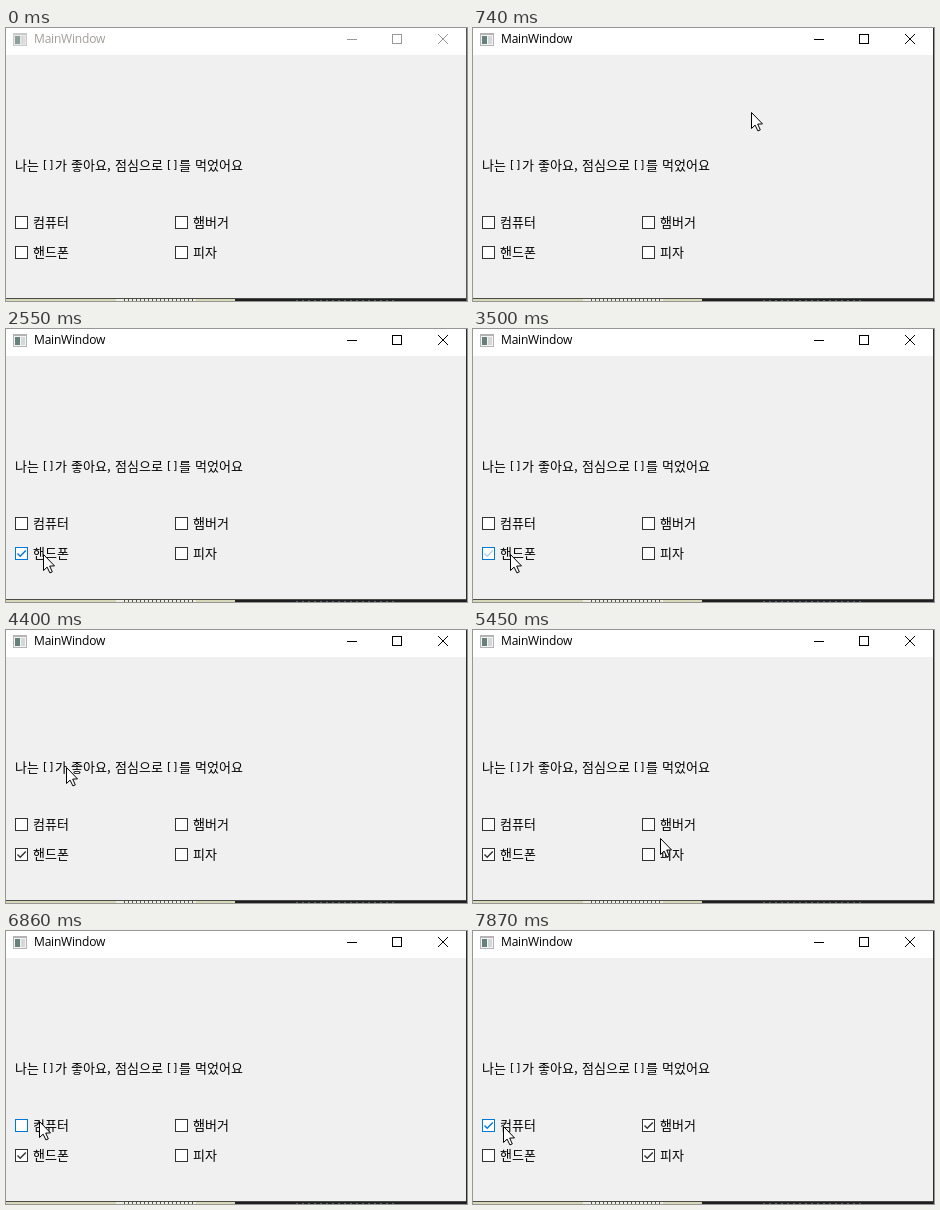
These frames come from a looping animation (461 px wide and 273 px high, 8000 ms). An HTML page with a canvas:

```html
<!DOCTYPE html>
<html lang="ko">
<head>
<meta charset="utf-8">
<style>
  html, body { margin: 0; width: 100%; height: 100%; overflow: hidden; background: #f0f0f0; }
  canvas { position: absolute; left: 0; top: 0; }
  span { position: absolute; white-space: pre; line-height: 16px; color: #000;
         font-family: "Noto Sans CJK KR", "Noto Sans CJK", sans-serif; font-size: 13px; }
  .bracket { font-family: "DejaVu Sans", sans-serif; font-size: 11px; }
  #title { left: 28px; top: 3px; font-family: "Open Sans", sans-serif;
           font-size: 12px; letter-spacing: -0.2px; }
</style>
</head>
<body>
<canvas id="back" width="461" height="273"></canvas>
<div id="labels"><span id="title">MainWindow</span></div>
<canvas id="front" width="461" height="273"></canvas>
<script>
const LOOP = 8000, STEP = 70, FADE = 210;
const ENTER = 180, ACTIVATE = 530;
const labels = document.getElementById('labels');
const title = document.getElementById('title');
const back = document.getElementById('back').getContext('2d');
const g = document.getElementById('front').getContext('2d');

// Cursor way-points: time, x, y
const path = [
  [ENTER, 455, 255], [ACTIVATE, 296, 98], [740, 278, 84], [880, 299, 111],
  [940, 299, 111], [1290, 98, 188], [1370, 98, 188], [1790, 46, 235],
  [2000, 37, 225], [4050, 37, 225], [4400, 60, 137], [4890, 187, 178],
  [5240, 200, 245], [5450, 187, 208], [5730, 269, 162], [6090, 29, 199],
  [6370, 18, 160], [6580, 46, 172], [6930, 30, 195]
];

const boxes = ['컴퓨터', '핸드폰', '햄버거', '피자'].map((text, i) => ({
  text, x: i < 2 ? 9 : 169, y: 188 + i % 2 * 30
}));
const [computer, phone] = boxes;

// The first box flips all four, the others only themselves
const clicks = [[2270, phone], [2820, phone], [3430, phone], [7660, computer]]
  .map(([at, box]) => ({ at, box, flips: box === computer ? boxes : [box] }));

const ticks = [0, ...path.map(k => k[0]), ...clicks.map(c => c.at)];

function addText(text, x, y) {
  const s = document.createElement('span');
  s.textContent = text;
  s.style.left = x + 'px';
  s.style.top = y + 'px';
  if (/[[\]]/.test(text)) s.className = 'bracket';
  labels.appendChild(s);
}

// Fixed advances: Hangul 12, brackets 6, blanks and commas 4
function addSentence(text, x, y) {
  for (const ch of text) {
    if (ch !== ' ') addText(ch, x, y);
    x += /[[\]]/.test(ch) ? 6 : /[ ,]/.test(ch) ? 4 : 12;
  }
}

addSentence('나는 []가 좋아요, 점심으로 []를 먹었어요', 9, 129);
boxes.forEach(b => addSentence(b.text, b.x + 18, b.y - 2));

function rect(c, color, x, y, w, h) {
  c.fillStyle = color;
  c.fillRect(x, y, w, h);
}

function line(c, color, width, ...pts) {
  c.strokeStyle = color;
  c.lineWidth = width;
  c.beginPath();
  pts.forEach(([x, y]) => c.lineTo(x, y));
  c.stroke();
}

// Sliver of the desktop below the window
function drawStrip() {
  rect(back, '#4a4b46', 0, 270, 461, 1);
  rect(back, '#d6d8b8', 0, 271, 229, 2);
  rect(back, '#eeeee2', 110, 271, 80, 2);
  rect(back, '#1d1f20', 229, 271, 232, 2);
  for (let x = 118; x < 190; x += 4) rect(back, '#555', x, 271, 1, 2);
  for (let x = 290; x < 390; x += 6) rect(back, '#596063', x, 272, 2, 1);
}

function drawWindow(active) {
  const ink = active ? '#000' : '#999';
  rect(back, '#f0f0f0', 0, 0, 461, 273);
  rect(back, '#fff', 0, 0, 461, 27);
  back.globalAlpha = active ? 1 : 0.7;
  rect(back, '#b4b4b4', 7, 5, 14, 13);
  rect(back, '#f4f4f4', 8, 7, 12, 10);
  rect(back, '#66807c', 9, 8, 5, 8);
  rect(back, '#d4d8d8', 15, 8, 4, 8);
  back.globalAlpha = 1;
  line(back, ink, 1, [341, 11.5], [351, 11.5]);
  back.strokeRect(386.5, 6.5, 9, 9);
  line(back, ink, 1, [432, 6], [442, 16]);
  line(back, ink, 1, [442, 6], [432, 16]);
  drawStrip();
  rect(back, active ? '#2b2b2b' : '#555', 460, 0, 1, 273);
  title.style.color = active ? '#000' : '#a39d97';
}

function checkAmount(box, t) {
  return clicks
    .filter(c => c.flips.includes(box) && t >= c.at + STEP)
    .reduce((v, c) => {
      const p = Math.min(1, (t - c.at) / FADE);
      return v + (1 - 2 * v) * p;
    }, box === phone ? 0 : 0);
}

function isHot(box, [x, y]) {
  return x >= box.x && x < box.x + 18 + 12 * box.text.length &&
         y >= box.y - 1 && y < box.y + 11;
}

function drawBox(b, t, pos) {
  const down = clicks.some(c => c.box === b && t >= c.at && t < c.at + STEP);
  const ink = down ? '#005499' : isHot(b, pos) ? '#0078d7' : '#333';
  rect(g, down ? '#cce4f7' : '#fff', b.x, b.y, 13, 13);
  g.strokeStyle = ink;
  g.lineWidth = 1;
  g.strokeRect(b.x + 0.5, b.y + 0.5, 12, 12);
  g.globalAlpha = checkAmount(b, t);
  line(g, ink, 1.4, [b.x + 2.5, b.y + 6.5], [b.x + 5.2, b.y + 9.2], [b.x + 10.8, b.y + 3.4]);
  g.globalAlpha = 1;
}

function cursorAt(t) {
  const i = path.findIndex(k => k[0] > t);
  if (i < 0) return path[path.length - 1].slice(1);
  if (i === 0) return path[0].slice(1);
  const a = path[i - 1], b = path[i];
  const p = (t - a[0]) / (b[0] - a[0]);
  return [1, 2].map(n => Math.round(a[n] + (b[n] - a[n]) * p));
}

function drawCursor([x, y]) {
  g.save();
  g.translate(x + 0.5, y + 0.5);
  g.beginPath();
  [[0, 0], [0, 16], [3.6, 12.6], [6.4, 18.4], [8.8, 17.4], [6.2, 11.6], [11, 11.4]]
    .forEach(([px, py]) => g.lineTo(px, py));
  g.closePath();
  g.fillStyle = '#fff';
  g.fill();
  g.strokeStyle = '#000';
  g.lineWidth = 1;
  g.stroke();
  g.restore();
}

function snap(t) {
  const from = Math.max(...ticks.filter(k => k <= t));
  return from + Math.floor((t - from) / STEP) * STEP;
}

const start = performance.now();
function frame() {
  const t = snap(Math.max(0, performance.now() - start) % LOOP);
  const pos = cursorAt(t);
  drawWindow(t >= ACTIVATE);
  g.clearRect(0, 0, 461, 273);
  boxes.forEach(b => drawBox(b, t, pos));
  if (t >= ENTER) drawCursor(pos);
  requestAnimationFrame(frame);
}
frame();
</script>
</body>
</html>
```
